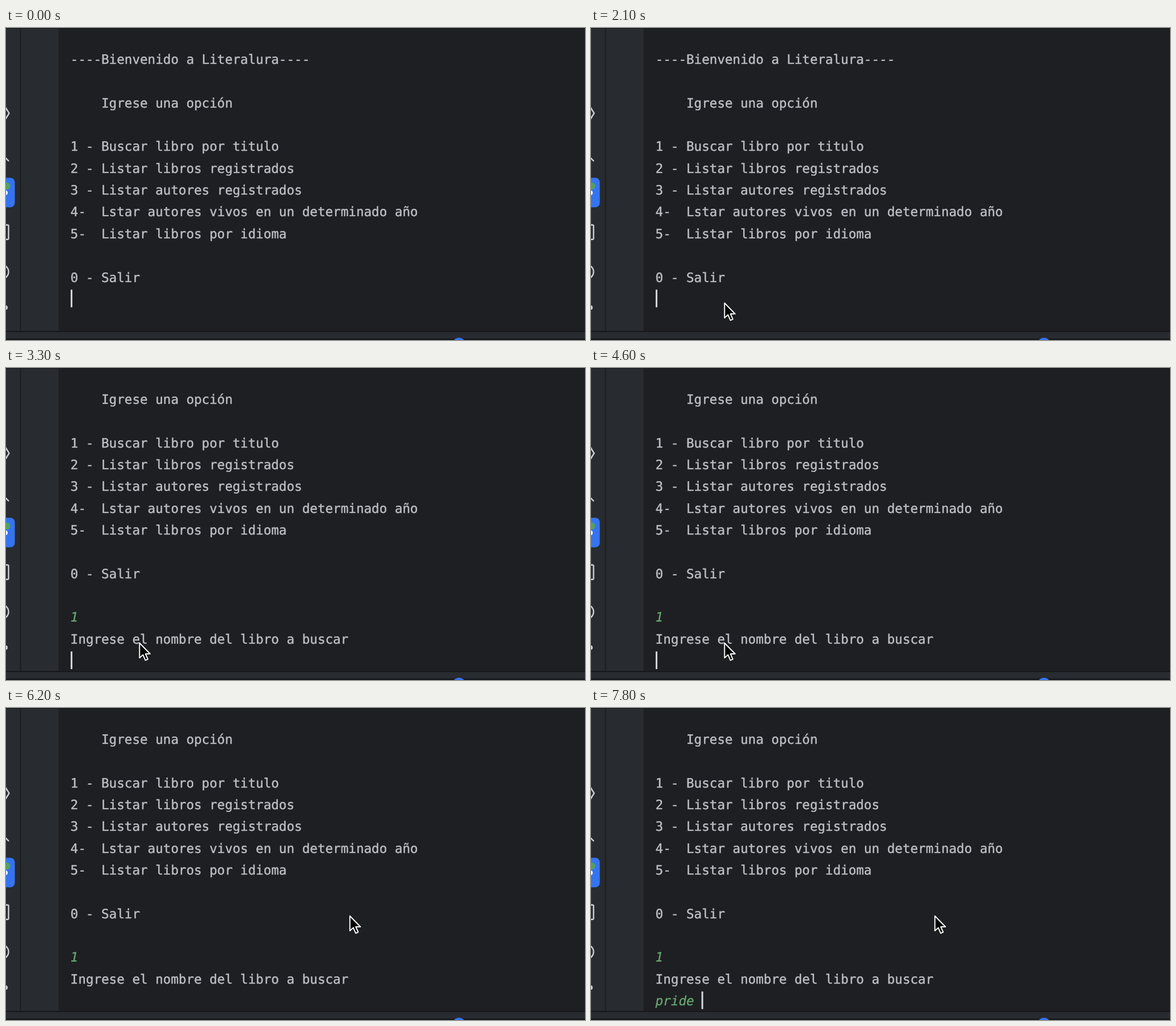
Animation, 1020 px wide and 549 px high, one loop 8 s. Source, as an HTML page:

```html
<!DOCTYPE html>
<html lang="es">
<head>
<meta charset="utf-8">
<title>Consola</title>
<style>
  html, body { margin: 0; width: 100%; height: 100%; overflow: hidden; background: #1e1f22; }
  svg { display: block; width: 1020px; height: 549px; }
  text {
    font: 22.6px "DejaVu Sans Mono", "Noto Sans Mono", monospace;
    text-rendering: geometricPrecision; white-space: pre;
    fill: #bcbec4; stroke: #bcbec4; stroke-width: .45px;
  }
  .input { fill: #6aab73; stroke: #6aab73; stroke-width: .25px; font-style: italic; }
  .icon { fill: none; stroke: #ced0d6; stroke-width: 2.4; }
</style>
</head>
<body>
<svg viewBox="0 0 1020 549">
  <rect width="1020" height="549" fill="#1e1f22"/>
  <g id="log"></g>

  <!-- tool strip and gutter -->
  <rect width="92.5" height="534" fill="#282b2f"/>
  <rect x="24.5" width="1.8" height="534" fill="#1c1d20"/>
  <g class="icon">
    <path d="M-1 139.5 L5.5 150 L-1 160.5"/>
    <path d="M-2 227 L5 234.5"/>
    <rect x="-20" y="346.5" width="24.5" height="25.5" rx="2"/>
    <circle cx="-8" cy="429" r="12.5"/>
  </g>
  <circle cx="-1" cy="492" r="4" fill="#ced0d6"/>
  <rect x="-36" y="263.5" width="51.5" height="52" rx="8" fill="#3574f0"/>
  <circle cx="1" cy="278" r="6.3" fill="#57a05c"/>
  <circle cx="-1" cy="290" r="4" fill="#fff"/>

  <!-- frame and status bar -->
  <rect width="1020" height="1" fill="#151619"/>
  <rect y="533" width="1020" height="16" fill="#17181b"/>
  <rect y="535" width="1020" height="11.5" fill="#282b2f"/>
  <circle cx="798" cy="557" r="12" fill="#3574f0"/>

  <rect id="caret" width="3" height="31" fill="#d5d7dc"/>
  <path id="mouse" d="M0 0 V26 L6 20.6 L10.3 30.3 L14.6 28.4 L10.4 19 H18.6 Z"
        fill="#000" stroke="#fff" stroke-width="1.9" stroke-linejoin="round"/>
</svg>
<script>
const LOOP = 8000, FRAME = 100;
const LEFT = 113.6, CELL = 13.45, ROW = 38.35, BASE = 63;
const CHOICE_AT = 2600, PROMPT_AT = 3300, WORD_AT = 6900, BURST_AT = 7270, KEY_GAP = 130;
const WORD = 'pride ';

const $ = id => document.getElementById(id);
const log = $('log'), caret = $('caret'), mouse = $('mouse');

function addLine(row, content, cls = '') {
  const el = document.createElementNS('http://www.w3.org/2000/svg', 'text');
  el.setAttribute('x', LEFT);
  el.setAttribute('y', BASE + row * ROW);
  el.setAttribute('class', cls);
  el.textContent = content;
  return log.appendChild(el);
}

[
  '----Bienvenido a Literalura----', '',
  '    Igrese una opción', '',
  '1 - Buscar libro por titulo',
  '2 - Listar libros registrados',
  '3 - Listar autores registrados',
  '4-  Lstar autores vivos en un determinado año',
  '5-  Listar libros por idioma', '',
  '0 - Salir'
].forEach((line, row) => line && addLine(row, line));

const choice = addLine(12, '1', 'input');
const prompt = addLine(13, 'Ingrese el nombre del libro a buscar');
const title = addLine(14, '', 'input');

// pointer: enters from below, settles, then leaves for the right
const entry = { x: 330, y: 556 };
const moves = [
  { from: 300, to: 1000, x: 234.3, y: 480.5 },
  { from: 1000, to: 1200, x: 235.3, y: 484 },
  { from: 5700, to: 6200, x: 605.8, y: 366 }
];

function pointerAt(t) {
  let { x, y } = entry;
  for (const m of moves) {
    const p = Math.min(1, Math.max(0, (t - m.from) / (m.to - m.from)));
    const ease = p * p * (3 - 2 * p);
    x += (m.x - x) * ease;
    y += (m.y - y) * ease;
  }
  return [x, y];
}

function lettersAt(t) {
  if (t < BURST_AT) return t >= WORD_AT ? 1 : 0;
  return Math.min(WORD.length, 2 + Math.floor((t - BURST_AT) / KEY_GAP));
}

// slow blink while idle, then half a second on and off, solid while typing
function caretOn(t) {
  if (t < CHOICE_AT) return t % 2100 < 1300;
  if (t < PROMPT_AT) return t < CHOICE_AT + 500;
  return t < PROMPT_AT + 300 || t >= WORD_AT || (t - PROMPT_AT - 300) % 1000 < 500;
}

const show = (el, on) => el.setAttribute('visibility', on ? 'visible' : 'hidden');

function draw(t) {
  const prompted = t >= PROMPT_AT, chosen = t >= CHOICE_AT;
  const typed = lettersAt(t);
  log.setAttribute('transform', `translate(0 ${prompted ? -2 * ROW : 0})`);
  show(choice, chosen);
  show(prompt, prompted);
  title.textContent = WORD.slice(0, typed);

  const col = chosen && !prompted ? 1 : typed;
  caret.setAttribute('x', LEFT + 0.3 + col * CELL);
  caret.setAttribute('y', BASE + (chosen ? 12 : 11) * ROW - 24.4);
  show(caret, caretOn(t));

  mouse.setAttribute('transform', `translate(${pointerAt(t)})`);
}

const start = performance.now();
function tick() {
  const t = (performance.now() - start) % LOOP;
  draw(Math.floor(t / FRAME) * FRAME);
  requestAnimationFrame(tick);
}
tick();
</script>
</body>
</html>
```
